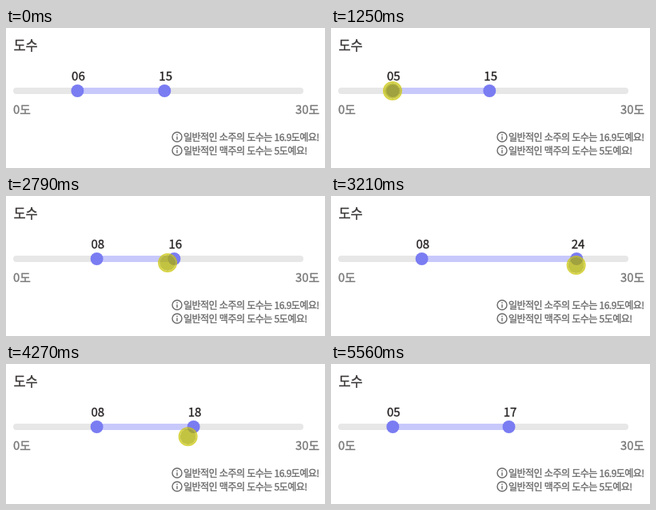
An HTML page that plays this animation: 399 by 176 pixels, repeating every 6870 ms.

```html
<!DOCTYPE html>
<html lang="ko">
<head>
<meta charset="utf-8">
<title>도수</title>
<style>
  html, body { margin: 0; width: 100%; height: 100%; overflow: hidden; background: #fff; }
  svg { display: block; width: 399px; height: 176px; }
  text {
    font-family: "Noto Sans CJK KR", "Noto Sans KR", "Noto Sans CJK", "Noto Sans", sans-serif;
    font-weight: 500; fill: currentColor; stroke: currentColor; stroke-width: .35px;
  }
  .title { font-size: 16.5px; color: #3a3636; }
  .value { font-size: 15px; color: #262222; text-anchor: middle; }
  .limit { font-size: 14.8px; color: #777; }
  .note { font-size: 12px; letter-spacing: -.53px; color: #6a6a6a; }
  .icon { fill: none; stroke: #6a6a6a; stroke-width: 1.4; }
  .thumb { fill: #7a7cf2; }
  .dot { fill: rgba(98, 98, 98, .72); }
  .ring { fill: none; stroke: rgba(120, 120, 120, .65); stroke-width: 2; }
  .down .dot { fill: rgba(174, 174, 0, .74); }
  .down .ring { stroke: rgba(202, 198, 10, .76); }
</style>
</head>
<body>
<svg viewBox="0 0 399 176">
  <defs>
    <g id="info" class="icon">
      <circle r="6"/>
      <path d="M0 -.8V3.4M0 -3.4V-2"/>
    </g>
  </defs>
  <text class="title" x="9.4" y="28">도수</text>
  <rect x="9" y="75" width="363" height="8" rx="4" fill="#e7e7e7"/>
  <rect id="range" y="75" height="8" fill="#c8c9fb"/>
  <circle class="thumb" cy="79" r="8"/>
  <circle class="thumb" cy="79" r="8"/>
  <text class="value" y="66"></text>
  <text class="value" y="66"></text>
  <text class="limit" x="9" y="108">0도</text>
  <text class="limit" x="392" y="108" text-anchor="end">30도</text>
  <use href="#info" x="214" y="137"/>
  <use href="#info" x="214" y="154"/>
  <text class="note" x="222" y="141.5">일반적인 소주의 도수는 16.9도예요!</text>
  <text class="note" x="222" y="158.5">일반적인 맥주의 도수는 5도예요!</text>
  <g id="cursor">
    <circle class="dot" r="10"/>
    <circle class="ring" r="11"/>
  </g>
</svg>
<script>
const LOOP = 6870, LAG = 25, SHOW = 330, HIDE = 5555;
const START = [6, 15];

// Key points of the pointer: time, x, y
const path = [
  [330, 152, 139], [1000, 94, 78], [1250, 77, 79], [1690, 55.5, 82],
  [1830, 55.5, 82], [1920, 89, 87], [2150, 118, 89], [2500, 191, 91],
  [2790, 202, 84], [3200, 305, 87], [3430, 329, 88], [3730, 280, 88],
  [4640, 184, 93], [4820, 129, 93], [4950, 121, 89], [5350, 86, 86],
  [5545, 144, 132]
];
const last = path.length - 1;

// Drags: press time, release time, thumb
const drags = [[1000, 2150, 0], [2520, 4380, 1], [4950, 5335, 0]];

const slope = (i, k) => (path[i + 1][k] - path[i][k]) / (path[i + 1][0] - path[i][0]);

function tangent(i, k) {
  if (i === 0 || i === last) return 0;
  const a = slope(i - 1, k), b = slope(i, k);
  return a * b > 0 ? 2 * a * b / (a + b) : 0;
}

// Monotone cubic through the key points
function pointer(t, k) {
  t = Math.max(path[0][0], Math.min(t, path[last][0]));
  let i = 0;
  while (i < last - 1 && t >= path[i + 1][0]) i++;
  const d = path[i + 1][0] - path[i][0], u = (t - path[i][0]) / d;
  const s = u * u * (3 - 2 * u);
  return path[i][k] * (1 - s) + path[i + 1][k] * s
    + d * u * (1 - u) * ((1 - u) * tangent(i, k) - u * tangent(i + 1, k));
}

const toX = v => 16.8 + 12.1 * v;
const toValue = x => Math.round((x - 16.8) / 12.1);

function valuesAt(t) {
  const values = [...START];
  for (const [down, up, n] of drags) {
    if (t < down) break;
    const grip = toX(values[n]) - pointer(down, 1);
    const seen = Math.max(down, Math.min(t - LAG, up));
    values[n] = toValue(pointer(seen, 1) + grip);
  }
  return values;
}

const range = document.getElementById('range');
const cursor = document.getElementById('cursor');
const thumbs = document.querySelectorAll('.thumb');
const labels = document.querySelectorAll('.value');

function draw(t) {
  const values = valuesAt(t), xs = values.map(toX);
  xs.forEach((x, n) => {
    thumbs[n].setAttribute('cx', x);
    labels[n].setAttribute('x', x + .8 + .04 * values[n]);
    labels[n].textContent = String(values[n]).padStart(2, '0');
  });
  range.setAttribute('x', xs[0]);
  range.setAttribute('width', xs[1] - xs[0]);
  cursor.setAttribute('transform', `translate(${pointer(t, 1)} ${pointer(t, 2)})`);
  cursor.classList.toggle('down', drags.some(([a, b]) => t >= a && t < b));
  cursor.style.display = t >= SHOW && t < HIDE ? '' : 'none';
}

const begin = performance.now();
function tick() {
  draw((performance.now() - begin) % LOOP);
  requestAnimationFrame(tick);
}
tick();
</script>
</body>
</html>
```
